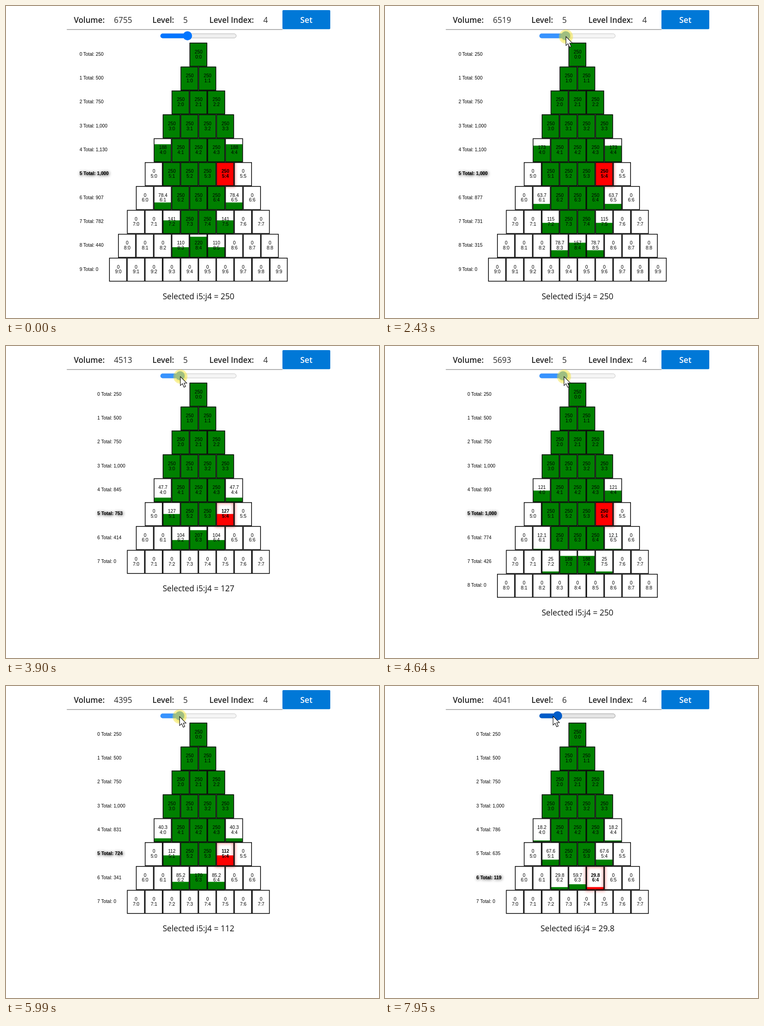
Write an HTML page that moves like this. It is 819 by 683 pixels and loops after 8000 ms.

```html
<!DOCTYPE html>
<html lang="en">
<head>
<meta charset="utf-8">
<title>Glass pyramid</title>
<style>
  html, body { margin: 0; width: 100%; height: 100%; overflow: hidden; background: #fff; }
  svg { display: block; width: 819px; height: 683px; }
  text { font: 10.24px "Liberation Sans", Arial, sans-serif; }
  .ui { font: 17.5px "Open Sans", "Noto Sans", sans-serif; fill: #2b2b2b; }
  .ui.name { font-size: 17.2px; font-weight: 600; fill: #222; }
  .ui.btn { font-size: 17.8px; font-weight: 600; fill: #fff; }
  .ui.note { font-size: 17.7px; fill: #111; }
  .mid { text-anchor: middle; }
  .sel { font-weight: bold; }
  .label.sel { filter: drop-shadow(1.5px 1px 3px #000); }
  .fill { fill: #008000; }
  .sel .fill { fill: #f00; }
  .sel text { font-weight: bold; }
  .edge { fill: none; stroke: #0c0c0c; stroke-width: 1.6; }
</style>
</head>
<body>
<svg id="stage" viewBox="0 0 819 683"></svg>
<script>
const LOOP = 8000, FRAME = 67.3, CAP = 250, ROWS = 10;
const MID = 422.4, TOP = 80.4, W = 39.2, H = 52.3;
const SHOW = 2, PRESS = 29, RELEASE = 100, PICK = 108;

// slider drags: first frame, last frame, notch reached
const DRAGS = [[29, 29, 22], [35, 35, 21], [40, 48, 11], [53, 58, 4], [66, 72, 18],
  [75, 75, 19], [82, 91, 2], [93, 93, 1], [99, 99, 0]];

// free pointer moves along Bezier curves
const MOVES = [
  { first: 2, last: 13, points: [[728, 553], [450, 140], [404, 71]] },
  { first: 14, last: 21, points: [[404, 71], [398, 67]] },
  { first: RELEASE, last: PICK, points: [[379, 67], [410, 260], [460, 410]] },
  { first: 110, last: 118, points: [[452, 379], [330, 250], [245, -85], [369, 66]] }
];

const stage = document.getElementById('stage');
function add(tag, attrs, parent = stage) {
  const el = document.createElementNS('http://www.w3.org/2000/svg', tag);
  set(el, attrs);
  return parent.appendChild(el);
}
function set(el, attrs) {
  for (const key in attrs) el.setAttribute(key, attrs[key]);
}
function write(x, y, words, cls, parent) {
  const el = add('text', { x, y, class: cls }, parent);
  el.textContent = words;
  return el;
}
const show = (el, on) => el.setAttribute('visibility', on ? 'visible' : 'hidden');
const fmt = n => n.toLocaleString('en-US', { maximumSignificantDigits: 3 });

// header
const BASE = 37.4;
add('rect', { x: 133.5, y: 50.8, width: 474, height: 1.4, fill: '#8f8f8f' });
write(149, BASE, 'Volume:', 'ui name');
write(321.5, BASE, 'Level:', 'ui name');
write(446.5, BASE, 'Level Index:', 'ui name');
const volumeText = write(237, BASE, '', 'ui');
const levelText = write(389, BASE, '', 'ui');
write(565, BASE, '4', 'ui');
add('rect', { x: 607, y: 9, width: 105, height: 41.7, rx: 2, fill: '#0078d7' });
write(659.5, BASE, 'Set', 'ui btn mid');

// slider
const track = add('rect', { x: 339.5, y: 60.8, width: 166, height: 9.2, rx: 4.6 });
const bar = add('rect', { x: 339, y: 60.3, height: 10.2, rx: 5 });
const thumb = add('circle', { cy: 65.3, r: 10 });

// pyramid
const blur = add('filter', { id: 'blur', x: '-60%', y: '-60%', width: '220%', height: '220%' });
add('feGaussianBlur', { stdDeviation: 3.5 }, blur);
const glow = add('rect', { width: W, height: 52, fill: 'none', stroke: '#f00', 'stroke-width': 4,
  opacity: .55, filter: 'url(#blur)' });
const cellX = (i, j) => MID + (j - (i + 1) / 2) * W;
const rows = Array.from({ length: ROWS }, (_, i) => {
  const y = TOP + i * H;
  const g = add('g', {});
  const label = write(0, y + 28.4, '', 'label', g);
  const cells = Array.from({ length: i + 1 }, (_, j) => {
    const x = cellX(i, j), box = add('g', {}, g);
    const fill = add('rect', { x: x + 1, width: W - 2, class: 'fill' }, box);
    add('rect', { x: x + .8, y: y + .8, width: W - 1.6, height: 50.6, class: 'edge' }, box);
    const value = write(x + W / 2 + .5, y + 23.4, '', 'mid', box);
    write(x + W / 2 + .5, y + 34.2, i + ':' + j, 'mid', box);
    return { box, fill, value };
  });
  return { g, y, label, cells };
});
const note = write(MID + .3, 0, '', 'ui note mid');

// pointer
const halo = add('g', { fill: '#f0e11e' });
add('circle', { r: 15.5, opacity: .42 }, halo);
add('circle', { r: 12, opacity: .25 }, halo);
const arrow = add('path', { d: 'M0 0V19.6L4.5 15.4L8 23.2L11.4 21.7L8.1 14.2H14Z',
  fill: '#fff', stroke: '#000', 'stroke-width': 1.1 });

const clamp = f => Math.min(1, Math.max(0, f));
const smooth = f => f * f * (3 - 2 * f);
const thumbX = volume => 349.9 + volume * .0072;

// the slider moves in whole notches of 118 with a quick start and a slow end
function volumeAt(n) {
  let notch = 23;
  for (const [first, last, to] of DRAGS) {
    const f = clamp((n - first + 1) / (last - first + 1));
    notch += (to - notch) * smooth(f ** .75);
  }
  return 4041 + 118 * Math.round(notch);
}

// each glass keeps CAP and passes the rest on in halves
function pour(volume) {
  const levels = [];
  let inflow = [volume];
  for (let i = 0; i < ROWS; i++) {
    const next = Array(i + 2).fill(0);
    levels.push(inflow.map((amount, j) => {
      const half = Math.max(0, amount - CAP) / 2;
      next[j] += half;
      next[j + 1] += half;
      return Math.min(CAP, amount);
    }));
    inflow = next;
  }
  return levels;
}

function drawPyramid(volume, level) {
  const levels = pour(volume);
  const totals = levels.map(row => row.reduce((a, b) => a + b));
  const dry = totals.indexOf(0);
  const count = dry < 0 ? ROWS : dry + 1;

  rows.forEach(({ g, y, label, cells }, i) => {
    g.style.display = i < count ? '' : 'none';
    label.textContent = `${i} Total: ${fmt(totals[i])}`;
    set(label, { x: MID - count * W / 2 - 65, class: i === level ? 'label sel' : 'label' });
    cells.forEach(({ box, fill, value }, j) => {
      const height = H * levels[i][j] / CAP;
      set(fill, { y: y + H - height, height });
      set(box, { class: i === level && j === 4 ? 'sel' : '' });
      value.textContent = fmt(levels[i][j]);
    });
  });
  set(glow, { x: cellX(level, 4), y: rows[level].y });
  volumeText.textContent = volume;
  levelText.textContent = level;
  note.textContent = `Selected i${level}:j4 = ${fmt(levels[level][4])}`;
  note.setAttribute('y', 642 - (ROWS - count) * H);
}

function bezier(points, f) {
  if (points.length === 1) return points[0];
  const mix = points.slice(1).map((p, i) => p.map((v, k) => points[i][k] + (v - points[i][k]) * f));
  return bezier(mix, f);
}

// while dragging, the pointer runs one frame ahead of the thumb
function pointerAt(n) {
  if (n >= PRESS && n < RELEASE) return [thumbX(volumeAt(n + 1)) + .5, 67];
  const { first, last, points } = MOVES.filter(m => m.first <= n).pop() || MOVES[0];
  const f = clamp((n - first) / (last - first));
  return bezier(points, f);
}

function drawSlider(volume, state) {
  const [color, ground, border] = {
    idle: ['#0075ff', '#efefef', '#b2b2b2'],
    hover: ['#005cc8', '#e5e5e5', '#9a9a9a'],
    press: ['#3793ff', '#f5f5f5', '#c4c4c4']
  }[state];
  const x = thumbX(volume);
  set(track, { fill: ground, stroke: border });
  set(bar, { fill: color, width: x - 339 });
  set(thumb, { fill: color, cx: x });
}

function render(n) {
  const volume = volumeAt(n);
  const [x, y] = pointerAt(n);
  const pressed = n >= PRESS && n < RELEASE;
  const over = n > 13 && x > 339 && x < 506 && y > 55 && y < 75;

  drawPyramid(volume, n < PICK ? 5 : 6);
  drawSlider(volume, pressed ? 'press' : over ? 'hover' : 'idle');
  set(arrow, { transform: `translate(${x} ${y})` });
  set(halo, { transform: `translate(${x} ${y})` });
  show(arrow, n >= SHOW);
  show(halo, pressed || n === PICK);
}

const start = performance.now();
let drawn = -1;
function loop() {
  const t = (performance.now() - start) % LOOP;
  const n = Math.floor(t / FRAME + .15);
  if (n !== drawn) render(drawn = n);
  requestAnimationFrame(loop);
}
loop();
</script>
</body>
</html>
```
